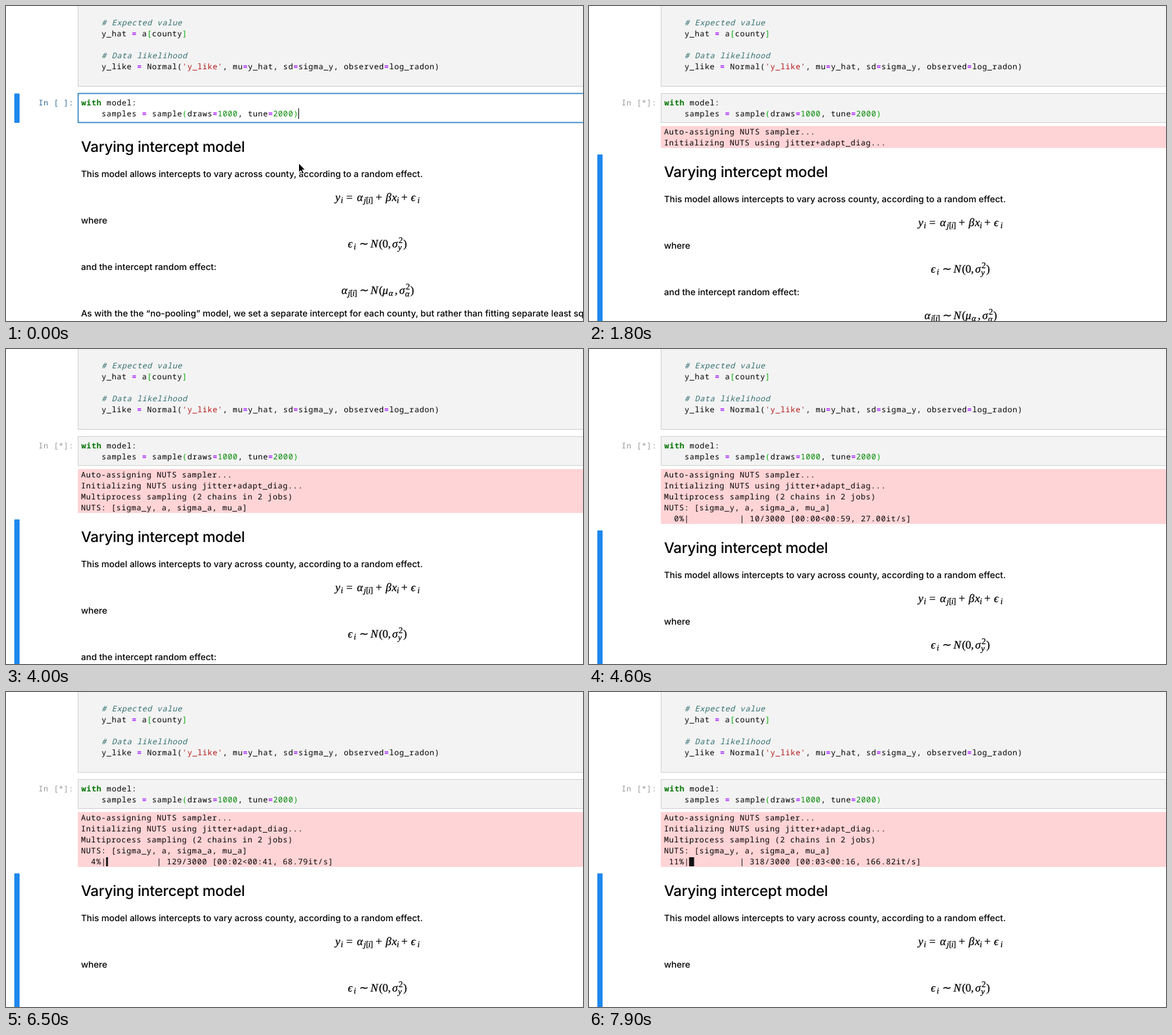
Write an HTML page that moves like this. It is 892 px wide and 488 px high and loops after 8 s.

```html
<!DOCTYPE html>
<html lang="en">
<head>
<meta charset="utf-8">
<title>Notebook sampling</title>
<style>
html, body { margin: 0; width: 100%; height: 100%; overflow: hidden; background: #fff; }
svg { display: block; width: 892px; height: 488px; }
text { white-space: pre; fill: #000; text-rendering: geometricPrecision; }
.mono { font: 500 12px "Noto Sans Mono", "DejaVu Sans Mono", monospace; letter-spacing: .6px; }
.body { font: 450 13.6px Inter, Roboto, sans-serif; }
.head { font: 550 22.7px Inter, Roboto, sans-serif; letter-spacing: -.25px; font-optical-sizing: none; }
.math { font: 17.5px "Liberation Serif", "Noto Serif", serif; stroke: #000; stroke-width: .25; }
.it { font-style: italic; }
.sub { font-size: 13px; }
.com { fill: #34706f; font-style: italic; }
.op { fill: #a2f; font-weight: bold; }
.str { fill: #b31616; }
.num { fill: #080; }
.br { fill: #0a0; }
.kw { fill: #007400; font-weight: bold; }
.cell { fill: #f3f3f3; stroke: #cfcfcf; }
.cell.active { fill: #fff; stroke: #3a8aca; stroke-width: 1.8; }
.bar { fill: #1e88ee; }
</style>
</head>
<body>
<svg id="stage" viewBox="0 0 892 488"></svg>
<script>
const LOOP = 8000, CHAR = 7.8, LEFT = 116, CODE_LEFT = 116.6, LINE = 17;
const RUN = 1200, INIT = 1300, CHAINS = 3400, PROGRESS = 4300, TOTAL = 3000;

// time, draws done, draws per second
const PACE = [
  [PROGRESS, 0, 0], [4700, 14, 36], [5500, 68, 55.63],
  [6500, 129, 68.79], [7900, 318, 166.82], [LOOP, 333, 170]
];

const stage = document.getElementById("stage");

function add(tag, attrs, parent = stage, content = "") {
  const el = document.createElementNS("http://www.w3.org/2000/svg", tag);
  for (const key in attrs) el.setAttribute(key, attrs[key]);
  el.textContent = content;
  parent.appendChild(el);
  return el;
}

const put = (cls, x, y, content, parent) => add("text", { class: cls, x, y }, parent, content);

// Each token is [class, text]; columns count monospace characters.
function code(col, y, tokens) {
  for (const [cls, text] of tokens) {
    put("mono " + cls, CODE_LEFT + col * CHAR, y, text);
    col += text.length;
  }
}

// Each part is [x, text, class, vertical shift].
function formula(parent, y, parts) {
  for (const [x, text, cls = "it", dy = 0] of parts) put("math " + cls, x, y + dy, text, parent);
}

const SUB = "it sub", UP = "sub";

add("rect", { class: "cell", x: 111.5, y: -5.5, width: 800, height: 130 });
const cell = add("rect", { class: "cell", x: 111.5, y: 135.5, width: 800, height: 45 });

code(4, 30, [["com", "# Expected value"]]);
code(4, 47, [["", "y_hat "], ["op", "="], ["", " a"], ["br", "["], ["", "county"], ["br", "]"]]);
code(4, 81, [["com", "# Data likelihood"]]);
code(4, 98, [["", "y_like "], ["op", "="], ["", " Normal("], ["str", "'y_like'"], ["", ", mu"], ["op", "="],
  ["", "y_hat, sd"], ["op", "="], ["", "sigma_y, observed"], ["op", "="], ["", "log_radon)"]]);
code(0, 154, [["kw", "with"], ["", " model:"]]);
code(4, 171, [["", "samples "], ["op", "="], ["", " sample"], ["br", "("], ["", "draws"], ["op", "="], ["num", "1000"],
  ["", ", tune"], ["op", "="], ["num", "2000"], ["br", ")"]]);

const prompt = put("mono", 50.3, 154, "");
const caret = add("rect", { x: 452, y: 158.5, width: 1, height: 16.5, fill: "#000" });
const bar = add("rect", { class: "bar", x: 12.8, width: 8.2, rx: 1.2 });

const pink = add("rect", { x: 111, y: 186, width: 781, height: 0, fill: "#ffd4d6" });
const logs = [
  "Auto-assigning NUTS sampler...",
  "Initializing NUTS using jitter+adapt_diag...",
  "Multiprocess sampling (2 chains in 2 jobs)",
  "NUTS: [sigma_y, a, sigma_a, mu_a]",
  ""
].map((text, i) => put("mono", LEFT, 199 + i * LINE, text));
const fill = add("rect", { x: LEFT + 5 * CHAR - .3, y: 256, height: 14, fill: "#111" });

const notes = add("g", {});
put("head", LEFT, 226, "Varying intercept model", notes);
[
  [265, "This model allows intercepts to vary across county, according to a random effect."],
  [337, "where"],
  [409, "and the intercept random effect:"],
  [481, "As with the the “no-pooling” model, we set a separate intercept for each county, but rather than fitting separate least squares"]
].forEach(([y, text]) => put("body", LEFT, y, text, notes));

formula(notes, 302, [
  [509, "y"], [517.5, "i", SUB, 3], [526, "=", ""], [542.5, "α"], [553, "j", SUB, 3],
  [556.5, "[", UP, 3], [560, "i", SUB, 3], [563, "]", UP, 3], [571.5, "+", ""], [587, "β"],
  [596.5, "x"], [604, "i", SUB, 3], [611, "+", ""], [626, "ϵ"], [636, "i", SUB, 3]
]);
formula(notes, 374, [
  [528.5, "ϵ"], [537.5, "i", SUB, 3], [546, "∼", ""], [563.5, "N"], [576.5, "(", ""], [582, "0", ""],
  [590.5, ",", ""], [597, "σ"], [607, "2", UP, -7], [606, "y", SUB, 4], [614, ")", ""]
]);
formula(notes, 446, [
  [518.5, "α"], [528.5, "j", SUB, 3], [532, "[", UP, 3], [535.5, "i", SUB, 3], [538.5, "]", UP, 3],
  [546.5, "∼", ""], [563.5, "N"], [576.5, "(", ""], [582, "μ"], [591.5, "α", SUB, 3], [601, ",", ""],
  [608, "σ"], [618, "2", UP, -7], [617, "α", SUB, 4], [625, ")", ""]
]);

const pointer = add("path", {
  d: "M452.5 243.5V257.8L455.8 254.8L458.2 260.2L460.6 259.1L458.3 253.9H462.6Z",
  fill: "#000", stroke: "#fff", "stroke-width": 1, "stroke-linejoin": "round"
});

const show = (el, on) => el.setAttribute("visibility", on ? "visible" : "hidden");

function pace(t) {
  const k = PACE.findIndex(p => p[0] > t);
  const a = PACE[k - 1], b = PACE[k], f = (t - a[0]) / (b[0] - a[0]);
  return [a[1] + f * (b[1] - a[1]), a[2] + f * (b[2] - a[2])];
}

const clock = s => "00:" + String(Math.floor(s)).padStart(2, "0");

function drawProgress(t) {
  const [draws, rate] = pace(t);
  const n = Math.floor(draws);
  const percent = String(Math.round(100 * n / TOTAL)).padStart(3);
  const left = n ? clock(Math.min(59, (TOTAL - n) / rate)) : "?";
  const speed = n ? rate.toFixed(2) : "?";
  logs[4].textContent =
    `${percent}%|${" ".repeat(10)}| ${n}/${TOTAL} [${clock((t - PROGRESS) / 1000)}<${left}, ${speed}it/s]`;
  fill.setAttribute("width", Math.floor(n / TOTAL * 80) * CHAR / 8);
}

function draw(time) {
  const t = Math.floor(time % LOOP / 100) * 100;
  const running = t >= RUN;
  const lines = t >= PROGRESS ? 5 : t >= CHAINS ? 4 : t >= INIT ? 2 : 0;
  const shift = lines ? lines * LINE + 5 : 0;

  cell.setAttribute("class", running ? "cell" : "cell active");
  prompt.textContent = running ? "In [*]:" : "In [ ]:";
  prompt.style.fill = running ? "#979797" : "#2f6796";
  show(caret, !running && t % 1000 < 500);
  show(pointer, !running);
  bar.setAttribute("y", running ? 191 + shift : 135.5);
  bar.setAttribute("height", running ? 400 : 45.5);
  pink.setAttribute("height", lines * LINE);
  notes.setAttribute("transform", `translate(0 ${shift})`);
  logs.forEach((log, i) => show(log, i < lines));
  show(fill, lines === 5);
  if (lines === 5) drawProgress(t);
}

const start = performance.now();
function tick() {
  draw(performance.now() - start);
  requestAnimationFrame(tick);
}
tick();
</script>
</body>
</html>
```
